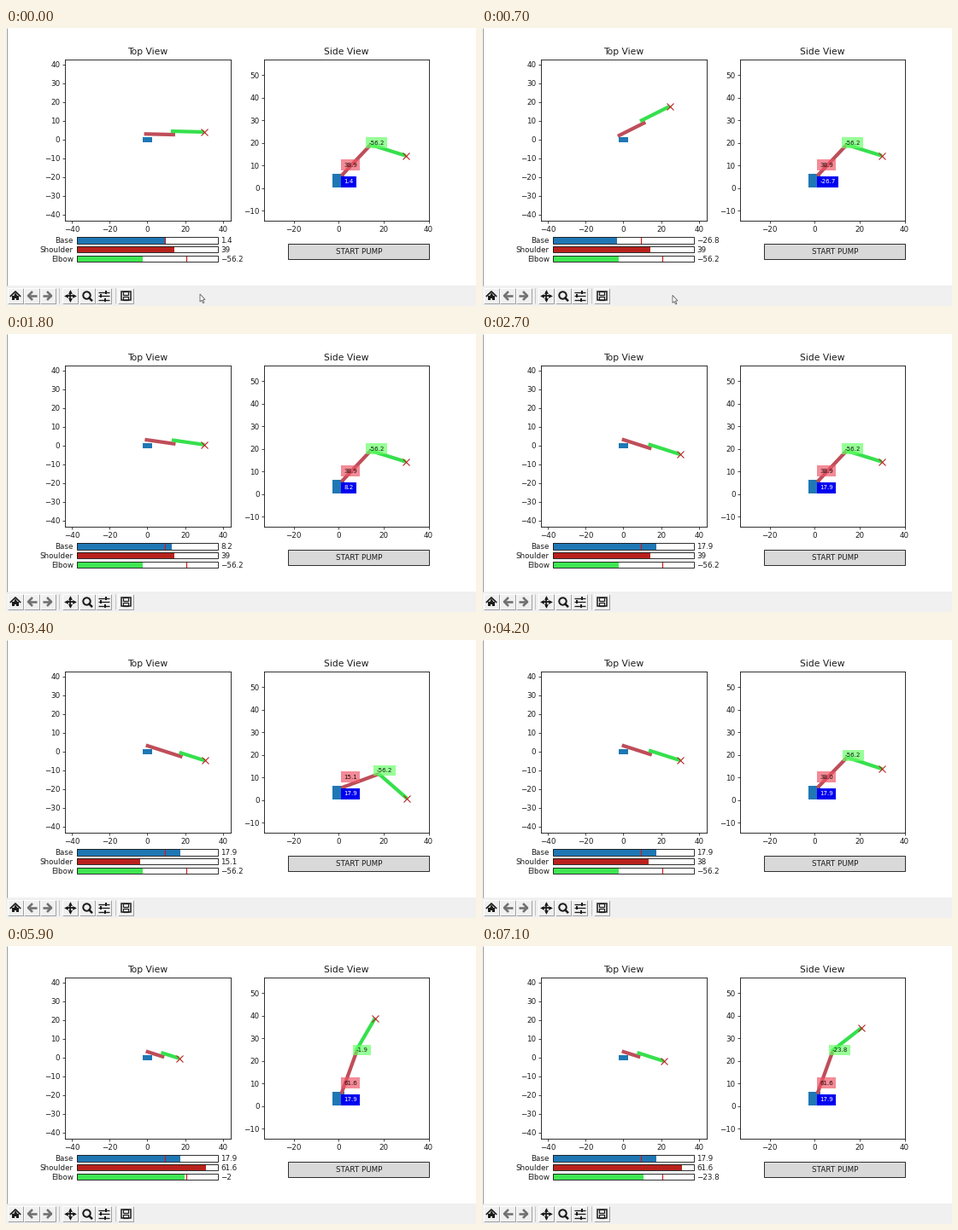
A matplotlib script that plays this animation: 550x326 px, repeating every 7200 ms.

```python
import numpy as np
import matplotlib.pyplot as plt
from matplotlib.animation import FuncAnimation
from matplotlib.patches import Polygon, Rectangle

W, H, DPI = 550, 326, 100
FRAMES, STEP = 72, 100
PX = 72 / DPI  # points per pixel

INK = "#1c1c1c"
BLUE, RED, GREEN = "#1f77b4", "#b8221c", "#3fe652"
LINK_RED, LINK_GREEN = "#be4e59", "#35e04c"

plt.rcParams.update({
    "font.family": "DejaVu Sans", "font.size": 8.75 * PX, "text.color": INK,
    "axes.linewidth": 0.9 * PX, "axes.edgecolor": INK,
    "xtick.color": INK, "ytick.color": INK})
fig = plt.figure(figsize=(W / DPI, H / DPI), dpi=DPI, facecolor="white")


# Motion, in ms and degrees

def track(t, value, *legs):
    """Follow legs of (start, end, goal, ease-out power) from a first value."""
    for t0, t1, goal, power in legs:
        u = np.clip((t - t0) / (t1 - t0), 0, 1)
        value += (goal - value) * (1 - (1 - u) ** power)
    return value


def swing(t, t0, t1, height):
    return height * np.sin(np.pi * np.clip((t - t0) / (t1 - t0), 0, 1))


def pose(t):
    base = track(t, 1.4, (0, 1300, -50.96, 1), (1300, 2100, 17.9, 2))
    shoulder = track(t, 38.96, (2800, 3400, 15.1, 1), (3400, 3600, -3, 1),
                     (3600, 4200, 38, 1), (4200, 5000, 61.6, 1))
    elbow = track(t, -56.2, (5200, 5900, -1.96, 1), (5900, 7100, -23.8, 1))
    return base, shoulder, elbow + swing(t, 5900, 7100, 38)


def polar(length, deg):
    a = np.radians(deg)
    return length * np.array([np.cos(a), np.sin(a)])


# Plots

def plot_axes(left, right, xlim, ylim, xticks, yticks, title):
    y0, y1 = 225.8, 36.7
    ax = fig.add_axes([left / W, 1 - y0 / H, (right - left) / W, (y0 - y1) / H])
    ax.set(xlim=xlim, ylim=ylim, xticks=xticks, yticks=yticks)
    ax.tick_params(length=3 * PX, width=0.8 * PX, pad=2.5 * PX)
    ax.tick_params(axis="x", pad=3.3 * PX)
    ax.set_title(title, fontsize=10.7 * PX, pad=5.3 * PX)
    return ax


def link(ax, color):
    return ax.plot([], [], color=color, lw=4.2 * PX,
                   solid_capstyle="butt", zorder=3)[0]


def cross(ax):
    return ax.plot([], [], "x", color="#b82222", ms=8.4 * PX,
                   mew=1.1 * PX, zorder=6)[0]


def tag(x, y, face, color, alpha):
    box = dict(boxstyle="square,pad=0.48", fc=face, ec="none", alpha=alpha)
    return side.text(x, y, "", color=color, fontsize=7.2 * PX, bbox=box,
                     zorder=5, va="baseline")


top = plot_axes(69, 263, (-43.6, 44.1), (-43.1, 42.8),
                range(-40, 41, 20), range(-40, 41, 10), "Top View")
side = plot_axes(302, 494.9, (-33.1, 40.1), (-14.4, 57),
                 range(-20, 41, 20), range(-10, 51, 10), "Side View")

top.add_patch(Rectangle((-2.5, -1.3), 5.2, 2.6, color=BLUE, lw=0))
side.add_patch(Rectangle((-2.6, 0.1), 5.2, 6.3, color=BLUE, lw=0))
top_upper, top_fore = link(top, LINK_RED), link(top, LINK_GREEN)
side_upper, side_fore = link(side, LINK_RED), link(side, LINK_GREEN)
top_tip, side_tip = cross(top), cross(side)
base_tag = tag(2.3, 2.1, "#0000f0", "white", 1)
shoulder_tag = tag(2.3, 9.5, "#ee5566", "#200808", 0.68)
elbow_tag = tag(0, 0, "#66ff66", "#082008", 0.68)

# Overlay in pixel coordinates for the widgets and the toolbar
ui = fig.add_axes([0, 0, 1, 1], zorder=5)
ui.set(xlim=(0, W), ylim=(H, 0))
ui.axis("off")


def rect(x, y, w, h, fc="none", ec="none", lw=0.0, z=1):
    return ui.add_patch(Rectangle((x, y), w, h, fc=fc, ec=ec, lw=lw * PX,
                                  zorder=z))


def stroke(xs, ys, color=INK, lw=1.0, z=4):
    ui.plot(xs, ys, color=color, lw=lw * PX, zorder=z, solid_capstyle="butt")


def mark(x, y, shape, size, fc=INK, ec="none", lw=0.0):
    ui.plot(x, y, shape, ms=size * PX, mfc=fc, mec=ec, mew=lw * PX, zorder=5)


class Slider:
    x, w, h = 82.8, 165, 7.2

    def __init__(self, name, y, color, lo, hi):
        self.lo, self.hi = lo, hi
        y0 = y - self.h / 2
        self.fill = rect(self.x, y0, 0, self.h, color)
        zero = self.x + self.width(0)
        stroke([zero, zero], [y0, y0 + self.h], "#d01818", 1.2, 2)
        rect(self.x, y0, self.w, self.h, ec=INK, lw=0.9, z=3)
        ui.text(79, y - 0.2, name, ha="right", va="center_baseline")
        self.text = ui.text(251.5, y - 0.2, "", va="center_baseline")

    def width(self, v):
        return self.w * (v - self.lo) / (self.hi - self.lo)

    def set(self, v):
        self.fill.set_width(self.width(v))
        self.text.set_text(f"{v:.1f}".removesuffix(".0").replace("-", "\u2212"))


sliders = [Slider("Base", 249, BLUE, -100, 60),
           Slider("Shoulder", 259.6, RED, -30, 70),
           Slider("Elbow", 270.2, GREEN, -140, 40)]

rect(330, 252.8, 165, 18, "#d9d9d9", INK, 0.9)
ui.text(412.7, 261.8, "START PUMP", ha="center", va="center_baseline")


def draw_toolbar():
    y, grey = 314, "#707070"
    rect(0, 302, W, H - 302, "#f0f0f0")
    for x in (11, 30, 49, 75, 95, 114, 140):
        stroke([x - 9, x + 9, x + 9], [y + 9, y + 9, y - 9], "#a0a0a0", 1, 2)
        stroke([x - 9, x - 9, x + 9], [y + 9, y - 9, y - 9], "white", 1, 2)
    for x in (62, 127.5):
        stroke([x, x], [y - 9, y + 9], "#c4c4c4", 1, 2)

    # home
    stroke([4.8, 11, 17.2], [y + 1, y - 5, y + 1], lw=1.7)
    rect(6.8, y, 3, 5.3, INK)
    rect(12.2, y, 3, 5.3, INK)
    mark(11, y - 0.7, "^", 7)
    # back and forward
    for x, d in ((30, 1), (49, -1)):
        stroke([x - 4 * d, x + 6 * d], [y, y], grey, 2.6)
        stroke([x + d, x - 4 * d, x + d], [y - 5, y, y + 5], grey, 2.6)
    # pan
    mark(75, y, "+", 11, ec=INK, lw=1.8)
    for shape, dx, dy in ((">", 1, 0), ("<", -1, 0), ("v", 0, 1), ("^", 0, -1)):
        mark(75 + 5 * dx, y + 5 * dy, shape, 4.8)
    # zoom
    mark(93.6, y - 1.2, "o", 8.4, "none", INK, 2)
    stroke([96.5, 101], [y + 1.7, y + 6.2], lw=2.5)
    # settings
    for dy, knob in ((-4.5, 117), (0, 111), (4.5, 116)):
        stroke([108, 120.5], [y + dy, y + dy], lw=1.3)
        stroke([knob, knob], [y + dy - 2, y + dy + 2], lw=2)
    # save
    rect(134.6, y - 5.3, 11, 10.6, "#f0f0f0", INK, 1.5, 4)
    rect(137, y - 5, 5.5, 3.5, "none", INK, 1.2, 5)
    rect(137, y + 1, 6, 4, "none", INK, 1.2, 5)


draw_toolbar()
stroke([0.5, 0.5], [0, 302], "#9a9a9a", 1, 1)
ARROW = np.array([(0, 0), (0, 9), (2, 7.2), (3.6, 10.6), (4.9, 10),
                  (3.4, 6.7), (6, 6.5)])
cursor = ui.add_patch(Polygon(ARROW, fc="white", ec="#6a6a6a", lw=0.9 * PX,
                              zorder=8))


def short(v):
    return f"{int(v * 10 + np.copysign(1e-6, v)) / 10:.1f}"


def segment(line, p, q):
    line.set_data([p[0], q[0]], [p[1], q[1]])


def update(i):
    t = i * STEP
    base, shoulder, elbow = angles = pose(t)
    tags = (base_tag, shoulder_tag, elbow_tag)
    for slider, label, v in zip(sliders, tags, angles):
        slider.set(v)
        label.set_text(short(v))
    elbow_tag.set_position(np.array([-1.3, 7.4]) + polar(18.9, shoulder))

    joint = np.array([-2.1, 6.3]) + polar(20.6, shoulder)
    tip = joint + polar(16.7, shoulder + elbow)
    segment(side_upper, (1.2, 5.4), joint + (0.4, 0))
    segment(side_fore, joint, tip)
    side_tip.set_data([tip[0]], [tip[1]])

    # Seen from above, the links sit side by side and turn with the base
    along, across = polar(1, -base), polar(1, 90 - base)
    end = along * tip[0] + across * 4.8
    segment(top_upper, along * -1.8 + across * 3,
            along * (joint[0] + 0.7) + across * 3)
    segment(top_fore, along * (joint[0] - 1.6) + across * 4.8, end)
    top_tip.set_data([end[0]], [end[1]])

    x = track(t, 227, (0, 1300, 219.5, 1))
    y = track(t, 312, (0, 1300, 314.5, 1), (1300, 1700, 331, 1))
    cursor.set_xy(ARROW + (x, y))
    return []


anim = FuncAnimation(fig, update, frames=FRAMES, interval=STEP,
                     repeat=True, repeat_delay=0)
plt.show()
```
